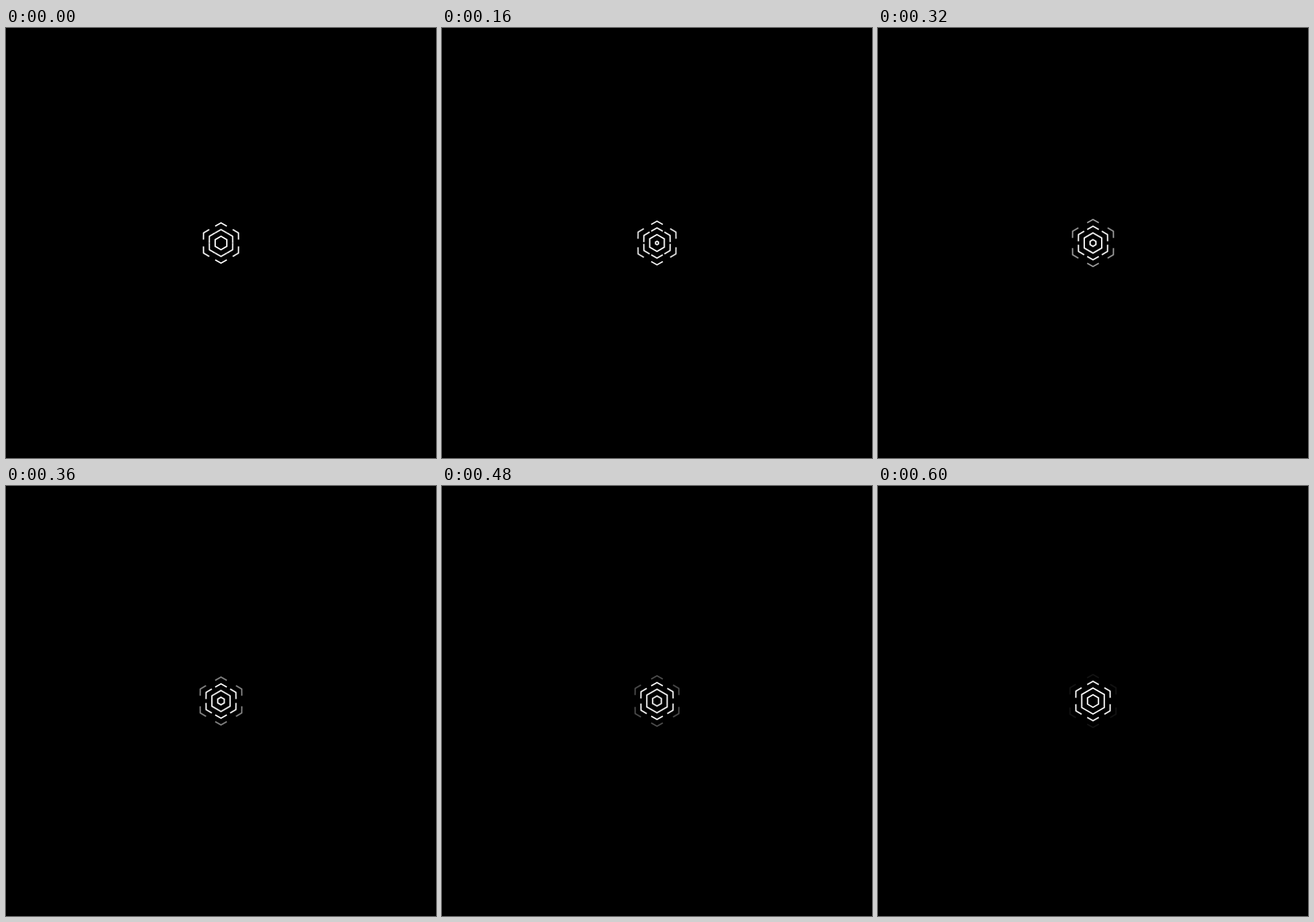
These frames come from a looping animation (748x748 px, 0.64 s). An HTML page:

```html
<!DOCTYPE html>
<html lang="en">
<head>
<meta charset="utf-8">
<title>Hexagon pulse</title>
<style>
  html, body { margin: 0; width: 100%; height: 100%; overflow: hidden; background: #000; }
  svg { display: block; width: 100%; height: 100%; }

  .stroke { fill: none; stroke: #fff; stroke-width: 2.3; }
  .hex, .corner { animation: 640ms steps(16) infinite; }
  .hex { vector-effect: non-scaling-stroke; }

  .seed { animation-name: seed; }
  .ring { animation-name: ring; }
  .near .corner { animation-name: near; }
  .far .corner { animation-name: far; }
  .far { animation: fade 640ms infinite; }

  /* Every ring grows by one radius step (11.7) per loop. */
  @keyframes seed { from { transform: scale(0); } to { transform: scale(1); } }
  @keyframes ring { from { transform: scale(1); } to { transform: scale(2); } }
  @keyframes near { from { transform: translateY(-23.4px); } to { transform: translateY(-35.1px); } }
  @keyframes far { from { transform: translateY(-35.1px); } to { transform: translateY(-46.8px); } }
  @keyframes fade {
    0% { opacity: 1; animation-timing-function: steps(3); }
    18.75% { opacity: 1; animation-timing-function: steps(13); }
    100% { opacity: 0; }
  }
</style>
</head>
<body>
<svg viewBox="-374 -374 748 748">
  <defs>
    <path id="hex" d="M0-11.7 10.13-5.85V5.85L0 11.7-10.13 5.85V-5.85Z"/>
  </defs>
  <g class="stroke">
    <path class="hex seed" d="M0-11.7 10.13-5.85V5.85L0 11.7-10.13 5.85V-5.85Z"/>
    <path class="hex ring" d="M0-11.7 10.13-5.85V5.85L0 11.7-10.13 5.85V-5.85Z"/>
    <g class="near"></g>
    <g class="far"></g>
  </g>
</svg>
<script>
  // Six corner pieces per outer ring, one for each direction.
  for (const ring of document.querySelectorAll('.near, .far')) {
    ring.innerHTML = Array.from({ length: 6 }, (_, i) =>
      `<g transform="rotate(${i * 60})"><path class="corner" d="M-10.13 5.85 0 0 10.13 5.85"/></g>`
    ).join('');
  }
</script>
</body>
</html>
```
